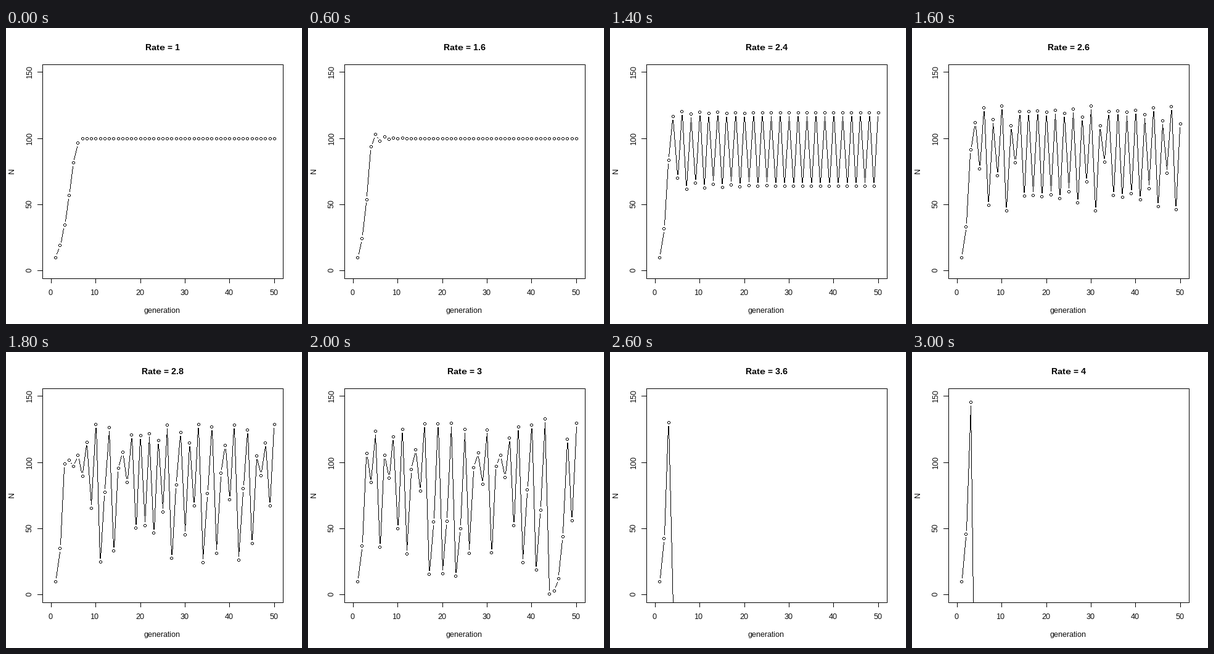
Write a matplotlib script that moves like this. It is 480 px wide and 480 px high and loops after 3.2 s.

```python
import matplotlib.pyplot as plt
import numpy as np
from matplotlib.animation import FuncAnimation

plt.rcParams.update({
    "font.family": "Liberation Sans",
    "text.hinting": "native",
    "text.hinting_factor": 1,
})

SIZE, DPI = 480, 96
LEFT, RIGHT, TOP, BOTTOM = 59.04, 449.76, 59.04, 406.56
X0, X1, Y0, Y1 = int(LEFT), int(RIGHT), int(TOP), int(BOTTOM)
XMAX, YMAX, PAD = 50, 150, 0.04
CAPACITY, START, GENERATIONS = 100, 10, 50
GAP = 6                            # space between a point and its line
TICK = 7.2


def to_x(gen):
    width = (RIGHT - LEFT) / (1 + 2 * PAD)
    return LEFT + width * (PAD + gen / XMAX)


def to_y(n):
    height = (BOTTOM - TOP) / (1 + 2 * PAD)
    return BOTTOM - height * (PAD + n / YMAX)


def grow(rate):
    sizes = [START]
    while len(sizes) < GENERATIONS and sizes[-1] >= 0:
        n = sizes[-1]
        sizes.append(n + rate * n * (1 - n / CAPACITY))
    return np.array(sizes)


def stroke(ink, a, b):
    """One-pixel line without smoothing, cut off at the edge of the plot."""
    a, b = np.floor(a), np.floor(b)
    count = int(np.abs(b - a).max()) + 1
    path = np.floor(np.linspace(a, b, count) + 0.5).astype(int)
    x, y = path[(path >= 0).all(axis=1) & (path < SIZE).all(axis=1)].T
    ink[y, x] = 0


def ring(ink, center):
    """Five-pixel circle."""
    x, y = np.floor(center).astype(int)
    for k in (-1, 0, 1):
        ink[[y - 2, y + 2, y + k, y + k], [x + k, x + k, x - 2, x + 2]] = 0


def plot(rate):
    n = grow(rate)
    pts = np.column_stack([to_x(np.arange(1, len(n) + 1)), to_y(n)])
    ink = np.full((SIZE, SIZE), 255, np.uint8)
    for p in pts[n >= 0]:
        ring(ink, p)
    for a, b in zip(pts[:-1], pts[1:]):
        dist = np.hypot(*(b - a))
        if dist > 2 * GAP:
            step = (b - a) * GAP / dist
            stroke(ink, a + step, b - step)
    ink[Y1 + 1:] = 255
    return np.minimum(ink, base)


def label(x, y, text, size=12, **kw):
    return ax.text(x, y, text, fontsize=size * 72 / DPI, ha="center",
                   va="baseline", rotation_mode="anchor", **kw)


fig = plt.figure(figsize=(SIZE / DPI, SIZE / DPI), dpi=DPI, facecolor="white")
ax = fig.add_axes([0, 0, 1, 1])
ax.axis("off")

base = np.full((SIZE, SIZE), 255, np.uint8)
base[[Y0, Y1], X0:X1 + 1] = 0
base[Y0:Y1 + 1, [X0, X1]] = 0
for gen in range(0, XMAX + 1, 10):
    x = to_x(gen)
    stroke(base, (x, BOTTOM), (x, BOTTOM + TICK))
    label(int(x) - 0.7, 433, str(gen))
for n in range(0, YMAX + 1, 50):
    y = to_y(n)
    stroke(base, (LEFT, y), (LEFT - TICK, y))
    label(42, int(y) - 0.7, str(n), rotation=90)

label(253.2, 462, "generation")
label(13, 231.3, "N", rotation=90)
title = label(254.4, 36, "", 14, weight="bold")

image = ax.imshow(base, cmap="gray", vmin=0, vmax=255, aspect="auto",
                  interpolation="nearest", extent=(0, SIZE, SIZE, 0))


def draw(i):
    rate = 1 + 0.2 * i
    title.set_text(f"Rate = {rate:g}")
    image.set_data(plot(rate))
    return title, image


anim = FuncAnimation(fig, draw, frames=16, interval=200, repeat=True,
                     repeat_delay=0, init_func=lambda: draw(0))
plt.show()
```
